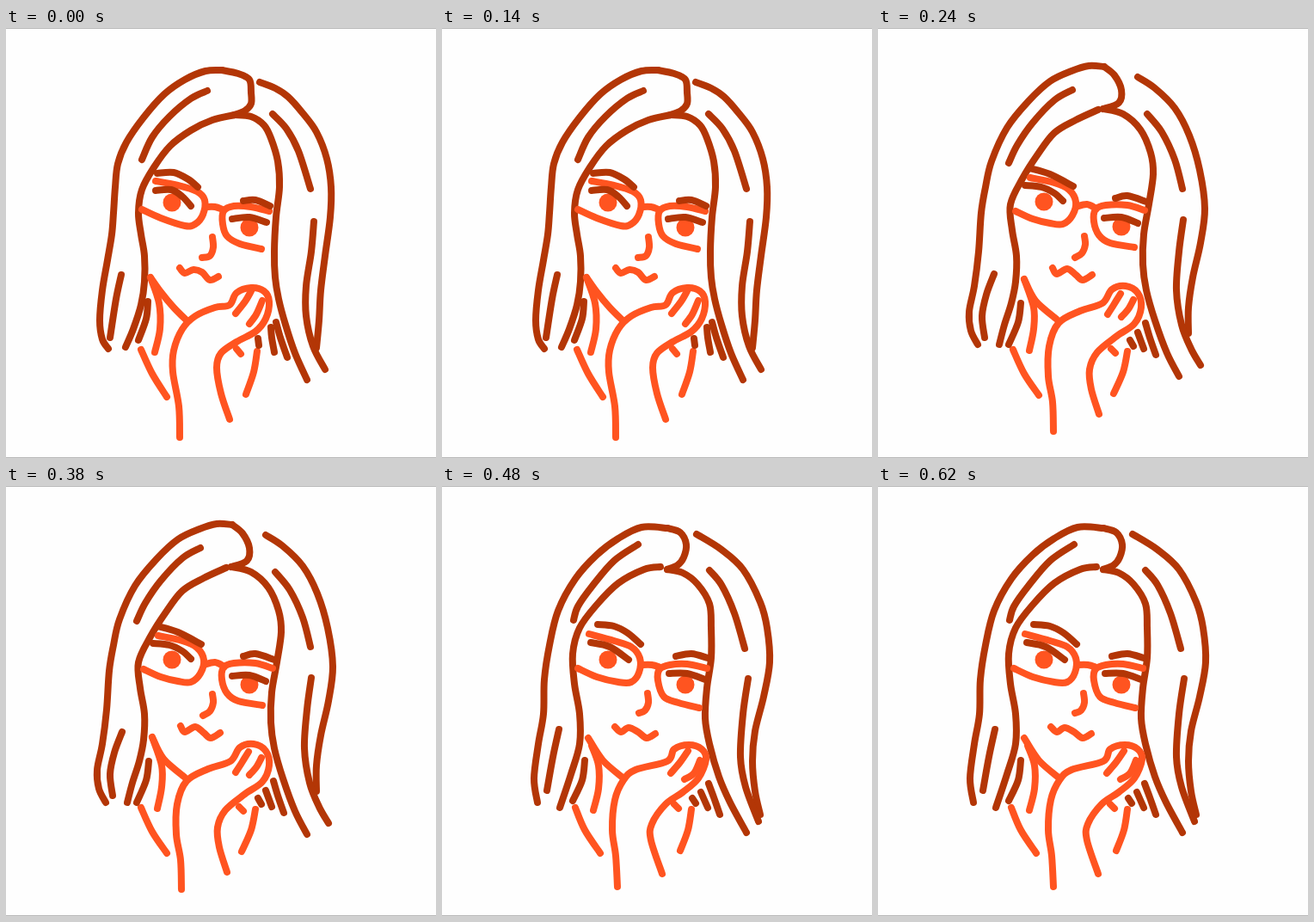
Animation, 500 px wide and 500 px high, one loop 0.72 s. Source, as an HTML page:

```html
<!DOCTYPE html>
<html lang="en">
<head>
<meta charset="utf-8">
<title>Portrait line boil</title>
<style>
  html, body { margin: 0; width: 100%; height: 100%; overflow: hidden; background: #fefefe; }
  svg { display: block; width: 100vw; height: 100vh; }
  .pose { visibility: hidden; animation: show 720ms step-end infinite; }
  .pose:nth-of-type(2) { animation-delay: -480ms; }
  .pose:nth-of-type(3) { animation-delay: -240ms; }
  @keyframes show {
    0% { visibility: visible; }
    33.3333%, 100% { visibility: hidden; }
  }
  path { fill: none; stroke-width: 8; stroke-linecap: round; stroke-linejoin: round; }
  .skin path { stroke: #ff5420; }
  .skin circle { fill: #ff5420; }
  .hair path { stroke: #b33606; }
  .edge { fill: #b9b9b9; }
</style>
</head>
<body>
<svg viewBox="0 0 500 500">
  <g class="pose">
    <g class="hair">
      <path data-p="251,49 232,50 208,60 184,77 160,104 140,133 130,158 127,185 125,215 123,240 118,270 112,305 109,340 112,362 119,373"/>
      <path data-p="251,49 270,53 283,60 285,75 285,88 278,96 266,101"/>
      <path data-p="295,63 313,70 328,80 345,99 361,121 373,152 378,185 377,220 371,265 366,305 364,340 361,372"/>
      <path data-p="358,225 355,260 349,300 349,335 357,370 371,397"/>
      <path data-p="266,101 285,103 300,113 308,128 316,155 318,185 314,220 312,260 313,290 317,315 325,345 336,378 350,409"/>
      <path data-p="266,101 240,107 215,119 191,137 172,162 158,188 154,215 157,240 161,265 161,295 157,322 148,350 139,371"/>
    </g>
    <g class="skin">
      <path data-p="174,178 200,183 222,190 231,200 229,217 220,228 208,230 180,221 158,211"/>
      <path data-p="232,208 243,208 252,211"/>
      <path data-p="306,213 285,208 265,207 253,213 252,228 257,242 272,251 297,257"/>
      <circle cx="193" cy="203" r="10.5"/>
      <circle cx="283" cy="232" r="10.5"/>
      <path data-p="240,243 241,255 237,265 228,267"/>
      <path data-p="202,279 208,285 218,281 228,284 237,293 247,289"/>
      <path data-p="168,290 180,307 195,325 211,341"/>
      <path data-p="168,290 178,320 179,350 173,377"/>
      <path data-p="157,374 170,402 187,429"/>
      <path data-p="202,476 201,440 194,400 195,375 205,350 220,335 243,325 260,322 268,308 285,302 300,306 306,318 302,338 290,353 268,365 250,378 245,395 250,425 260,455"/>
      <path data-p="285,306 278,318 267,332"/>
      <path data-p="298,317 291,333 283,344"/>
      <path data-p="268,373 273,379"/>
      <path data-p="292,376 288,400 279,426"/>
    </g>
    <g class="hair">
      <path data-p="134,287 128,315 121,360"/>
      <path data-p="165,318 163,338 154,363"/>
      <path data-p="234,73 215,82 190,103 170,127 158,153"/>
      <path data-p="310,100 326,117 340,143 354,187"/>
      <path data-p="176,169 195,168 212,176 223,185"/>
      <path data-p="174,189 192,188 205,196 215,207"/>
      <path data-p="276,201 290,200 307,207"/>
      <path data-p="263,222 283,220 303,226"/>
      <path data-p="308,348 309,360 312,377"/>
      <path data-p="314,342 319,360 327,383"/>
      <path data-p="293,361 294,369"/>
    </g>
  </g>

  <g class="pose">
    <g class="hair">
      <path data-p="263,45 245,44 225,50 200,62 175,85 150,116 132,155 125,185 120,215 117,260 112,300 106,330 108,352 116,368"/>
      <path data-p="263,45 275,55 283,72 280,87 262,94"/>
      <path data-p="302,57 322,70 345,93 362,125 374,165 380,210 375,250 366,290 361,325 361,355"/>
      <path data-p="355,223 350,260 347,305 353,345 364,373 375,392"/>
      <path data-p="262,94 285,100 305,118 317,145 320,170 315,205 309,240 308,275 312,305 322,340 336,378 350,405"/>
      <path data-p="256,95 230,107 205,122 185,148 168,175 154,205 156,235 161,265 160,295 155,320 147,345 141,368"/>
    </g>
    <g class="skin">
      <path data-p="177,174 205,180 222,188 230,202 226,218 215,228 200,227 180,222 160,213"/>
      <path data-p="230,208 243,205 254,210"/>
      <path data-p="310,212 290,206 265,206 253,211 251,225 257,241 270,250 298,255"/>
      <circle cx="193" cy="202" r="10.5"/>
      <circle cx="283" cy="231" r="10.5"/>
      <path data-p="240,242 241,252 237,262 229,267"/>
      <path data-p="203,279 208,286 220,280 230,287 238,293 249,287"/>
      <path data-p="170,292 183,317 207,338"/>
      <path data-p="170,292 181,325 181,350 176,375"/>
      <path data-p="157,374 170,402 187,427"/>
      <path data-p="204,469 203,435 198,405 199,370 210,343 235,329 261,320 272,304 288,300 302,308 306,325 298,344 278,358 255,377 246,397 248,420 257,449"/>
      <path data-p="282,309 274,322 267,333"/>
      <path data-p="297,316 291,327 283,336"/>
      <path data-p="271,373 276,378"/>
      <path data-p="290,376 285,400 274,425"/>
    </g>
    <g class="hair">
      <path data-p="135,286 126,310 121,335 124,360"/>
      <path data-p="166,320 163,342 152,368"/>
      <path data-p="226,72 205,84 180,110 162,136 152,157"/>
      <path data-p="313,100 330,121 345,153 354,187"/>
      <path data-p="176,163 200,170 227,184"/>
      <path data-p="171,183 190,185 205,192 215,201"/>
      <path data-p="276,198 290,195 312,202"/>
      <path data-p="263,221 283,220 302,227"/>
      <path data-p="311,343 316,360 323,380"/>
      <path data-p="302,354 309,373"/>
      <path data-p="293,363 297,370"/>
    </g>
  </g>

  <g class="pose">
    <g class="hair">
      <path data-p="262,49 232,48 205,61 180,80 155,108 135,145 125,185 119,225 118,265 112,300 107,340 111,368"/>
      <path data-p="262,49 277,54 284,68 281,83 274,92 262,97"/>
      <path data-p="296,56 325,74 350,97 370,135 378,165 381,205 374,245 364,285 361,320 364,355 370,382"/>
      <path data-p="356,224 350,265 347,315 353,350 368,390"/>
      <path data-p="262,97 280,101 297,114 311,137 313,165 313,200 308,235 306,270 311,300 322,338 335,368 354,403"/>
      <path data-p="254,94 235,97 205,113 180,138 160,165 152,195 154,230 160,265 160,300 150,335 137,374"/>
    </g>
    <g class="skin">
      <path data-p="171,172 200,180 220,187 230,200 229,217 220,228 205,228 180,222 158,212"/>
      <path data-p="231,208 244,208 254,211"/>
      <path data-p="308,212 285,207 265,208 253,213 251,226 258,245 275,252 299,258"/>
      <circle cx="193" cy="202" r="10.5"/>
      <circle cx="283" cy="231" r="10.5"/>
      <path data-p="239,241 240,252 236,261 229,264"/>
      <path data-p="201,280 208,286 217,281 228,286 238,293 248,288"/>
      <path data-p="170,293 187,319 210,339"/>
      <path data-p="174,302 182,325 182,352 176,377"/>
      <path data-p="155,374 166,400 184,427"/>
      <path data-p="204,466 202,430 198,400 201,365 211,342 225,330 262,320 270,306 287,301 302,306 307,318 298,340 280,356 260,370 244,393 243,412 256,451"/>
      <path data-p="286,308 277,321 266,334"/>
      <path data-p="300,319 293,334 282,341"/>
      <path data-p="270,370 275,375"/>
      <path data-p="290,376 286,400 277,424"/>
    </g>
    <g class="hair">
      <path data-p="136,283 129,315 122,354"/>
      <path data-p="166,319 163,342 152,366"/>
      <path data-p="228,68 200,87 175,116 158,140 153,156"/>
      <path data-p="311,98 325,115 340,148 352,189"/>
      <path data-p="181,161 200,163 216,171 231,184"/>
      <path data-p="173,182 195,187 217,202"/>
      <path data-p="272,198 290,195 309,200"/>
      <path data-p="264,218 285,218 306,225"/>
      <path data-p="310,346 316,362 323,382"/>
      <path data-p="301,356 309,374"/>
      <path data-p="291,363 295,369"/>
    </g>
  </g>
  <rect class="edge" width="500" height="1"/>
  <rect class="edge" y="499" width="500" height="1"/>
</svg>
<script>
  // Smooth curve through the points of a stroke
  function smooth(text) {
    const pts = text.split(' ').map(p => p.split(',').map(Number));
    const at = i => pts[Math.max(0, Math.min(pts.length - 1, i))];
    const handle = (p, a, b) => p.map((v, k) => v + (b[k] - a[k]) / 6);
    let d = 'M' + pts[0];
    for (let i = 0; i < pts.length - 1; i++) {
      const [a, b, c, e] = [at(i - 1), at(i), at(i + 1), at(i + 2)];
      d += ` C${handle(b, a, c)} ${handle(c, e, b)} ${c}`;
    }
    return d;
  }
  for (const path of document.querySelectorAll('path')) {
    path.setAttribute('d', smooth(path.dataset.p));
  }
</script>
</body>
</html>
```
